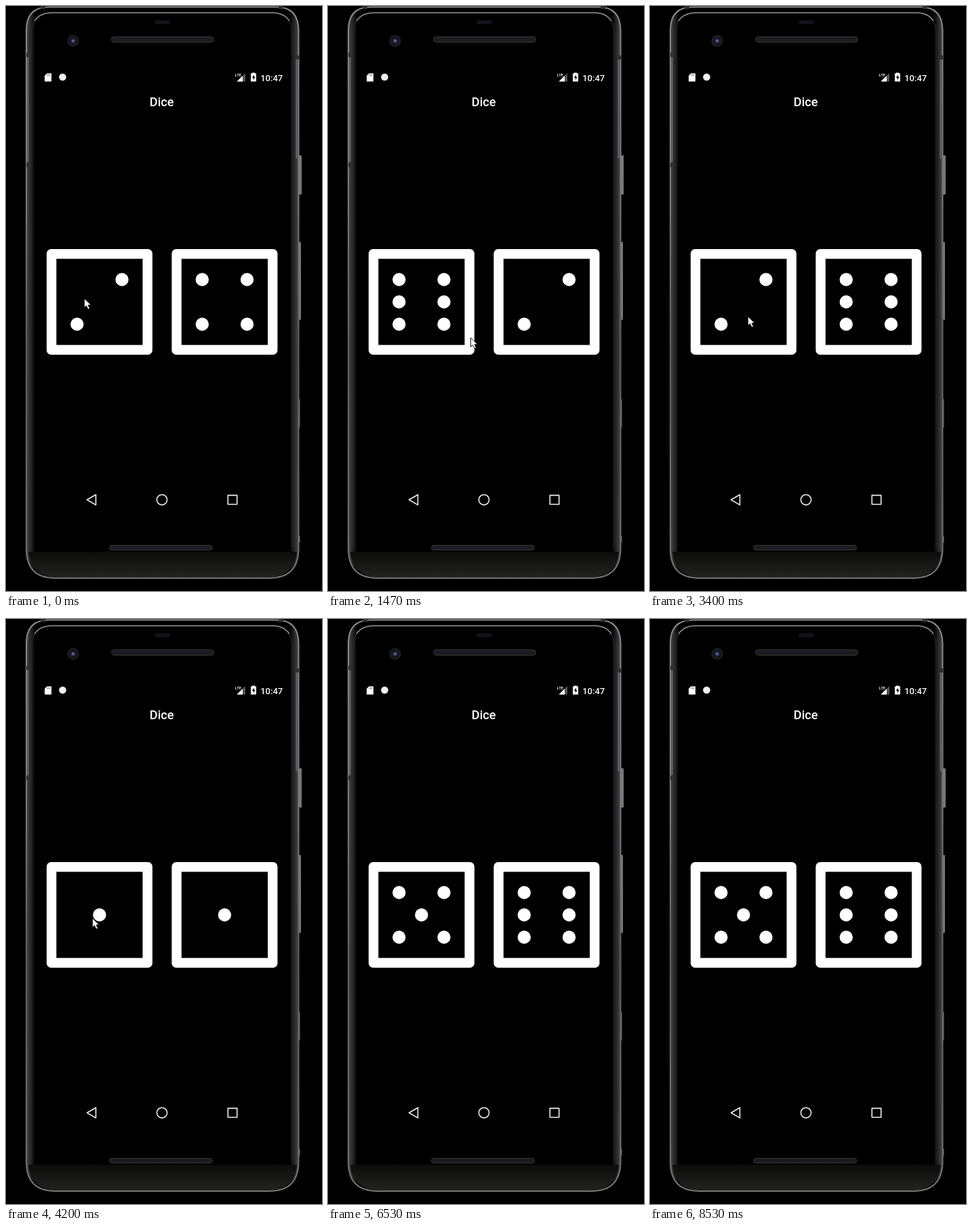
Animation of 466 by 864 pixels, one loop 8.59 s. Source, as an HTML page:

```html
<!DOCTYPE html>
<html lang="en">
<head>
<meta charset="utf-8">
<title>Dice</title>
<style>
html, body { margin: 0; width: 100%; height: 100%; overflow: hidden; background: #000; }
svg { display: block; width: 466px; height: 864px; }
text { font-family: Roboto, Inter, sans-serif; fill: #fff; font-weight: 500; }
</style>
</head>
<body>
<svg viewBox="0 0 466 864">
  <defs>
    <linearGradient id="rim" x1="0" x2="0" y1="0" y2="1">
      <stop offset="0" stop-color="#8a8a8c"/>
      <stop offset=".3" stop-color="#7c7c80"/>
      <stop offset=".6" stop-color="#606060"/>
      <stop offset="1" stop-color="#74746f"/>
    </linearGradient>
    <linearGradient id="chin" x1="0" x2="0" y1="0" y2="1">
      <stop offset="0" stop-color="#0c0c0b"/>
      <stop offset="1" stop-color="#22221f"/>
    </linearGradient>
    <linearGradient id="edge" x1="0" x2="1">
      <stop offset="0" stop-color="#484846"/>
      <stop offset=".016" stop-color="#26262a"/>
      <stop offset=".032" stop-color="#000"/>
      <stop offset=".968" stop-color="#000"/>
      <stop offset=".984" stop-color="#26262a"/>
      <stop offset="1" stop-color="#484846"/>
    </linearGradient>
    <radialGradient id="lens">
      <stop offset="0" stop-color="#8890b8"/>
      <stop offset=".3" stop-color="#25284c"/>
      <stop offset=".6" stop-color="#101018"/>
      <stop offset="1" stop-color="#262624"/>
    </radialGradient>
  </defs>
  <rect width="466" height="864" fill="#000"/>

  <!-- phone body -->
  <g fill="#777" stroke="#888884" stroke-width=".8">
    <path d="M431 221h4.5v57H431zM430 349h4.5v114H430z"/>
    <path d="M430 581h3v41h-3zM430 783h3v9h-3z" fill="#555"/>
  </g>
  <path d="M62 1.5H400Q431 2 431.5 36V802Q431 845 388 845H73Q30 845 30 802V36Q30 2 62 1.5Z" fill="url(#edge)"/>
  <path d="M33 806H429Q426 843 386 844H75Q36 843 33 806Z" fill="url(#chin)"/>
  <path d="M62 1.5H400Q431 2 431.5 36V802Q431 845 388 845H73Q30 845 30 802V36Q30 2 62 1.5Z" fill="none" stroke="url(#rim)" stroke-width="2"/>
  <path d="M38 800V38Q39 12 66 10H394Q420 12 422 38V800" fill="none" stroke="#26262c" stroke-width="1.2"/>
  <path d="M42 22Q50 10 68 10H393Q410 10 418 22" fill="none" stroke="#909094" stroke-width="1.4"/>
  <path d="M32.5 76V230M428.5 76V225" stroke="#66666c" stroke-width="2"/>
  <path d="M30 235h6M30 72h6M426 76h6M51 1.5h7M402 1.5h7" stroke="#30302c" stroke-width="6"/>
  <rect x="219" y="21" width="23" height="6" rx="3" fill="#12121a"/>
  <circle cx="99" cy="51.5" r="8.5" fill="url(#lens)"/>
  <g fill="#1b1b22" stroke="#38372e">
    <rect x="155.5" y="45.5" width="151" height="8" rx="4"/>
    <rect x="152.5" y="796.5" width="152" height="7" rx="3.5"/>
  </g>

  <!-- status bar -->
  <path d="M60.5 99.5H67V111.5H57V103Z" fill="#fff"/>
  <path d="M61 101v2.5M63 101v2.5M65 101v2.5" stroke="#555" stroke-width=".8"/>
  <circle cx="83.5" cy="105" r="5.3" fill="#f2f2f2"/>
  <path d="M353 99V111.5H340.5Z" fill="#555"/>
  <path d="M349 103V111.5H340.5Z" fill="#fff"/>
  <text x="337.5" y="104" font-size="6" stroke="#000" stroke-width="1.2" paint-order="stroke">LTE</text>
  <path d="M363 99.5V98.5H367V99.5H369V111.5H361V99.5Z" fill="#fff"/>
  <path d="M365.8 101.5L362.8 106H364.8V109.5L367.6 104.8H365.8Z" fill="#000"/>
  <text x="375.2" y="110.7" font-size="13">10:47</text>
  <text x="229.7" y="148" font-size="18.2" text-anchor="middle">Dice</text>

  <g id="dice"></g>

  <!-- navigation bar -->
  <g fill="none" stroke="#eee" stroke-width="1.6" stroke-linejoin="round">
    <path d="M119.5 729.3L132.5 721.7V736.9Z"/>
    <circle cx="230" cy="729.3" r="7.6"/>
    <rect x="327.3" y="722.6" width="13.4" height="13.4"/>
  </g>
  <path id="pointer" d="M0 0V13.5L3 10.7L5.5 16L8 15L5.7 9.8H10Z" fill="#fff" stroke="#000" stroke-width=".9"/>
</svg>
<script>
const LOOP = 8590;
const POINTER_GONE = 5900;
const rolls = [[0, 2, 4], [800, 6, 2], [2450, 2, 6], [4200, 1, 1], [5700, 5, 6]];
const path = [[0, 115.5, 432], [1470, 210.5, 490], [3400, 144.5, 458.5], [5000, 110.5, 425.5]];

// Column and row of each pip, relative to the centre of the die.
const pips = {
  1: [[0, 0]],
  2: [[1, -1], [-1, 1]],
  4: [[-1, -1], [1, -1], [-1, 1], [1, 1]]
};
pips[5] = [...pips[4], ...pips[1]];
pips[6] = [...pips[4], [-1, 0], [1, 0]];

const diceGroup = document.getElementById('dice');
const pointer = document.getElementById('pointer');

const square = (cx, size, radius, fill) =>
  `<rect x="${cx - size / 2}" y="${437 - size / 2}" width="${size}" height="${size}" rx="${radius}" fill="${fill}"/>`;

function die(cx, value) {
  const dots = pips[value].map(([x, y]) =>
    `<circle cx="${cx + x * 33.1}" cy="${437 + y * 33}" r="9.7" fill="#fff"/>`);
  return square(cx, 156, 6.5, '#fff') + square(cx, 127.2, 0, '#000') + dots.join('');
}

function pointerAt(t) {
  const next = path.findIndex(p => p[0] > t);
  if (next < 0) return path[path.length - 1].slice(1);
  const [t0, x0, y0] = path[next - 1];
  const [t1, x1, y1] = path[next];
  const u = (t - t0) / (t1 - t0);
  const ease = u * u * (3 - 2 * u);
  return [x0 + (x1 - x0) * ease, y0 + (y1 - y0) * ease];
}

let shown;
function render(t) {
  const roll = rolls.filter(r => r[0] <= t).pop();
  if (roll !== shown) {
    diceGroup.innerHTML = die(137.9, roll[1]) + die(322.4, roll[2]);
    shown = roll;
  }
  pointer.setAttribute('transform', `translate(${pointerAt(t)})`);
  pointer.setAttribute('visibility', t < POINTER_GONE ? 'visible' : 'hidden');
}

const start = performance.now();
function tick() {
  render((performance.now() - start) % LOOP);
  requestAnimationFrame(tick);
}
tick();
</script>
</body>
</html>
```
